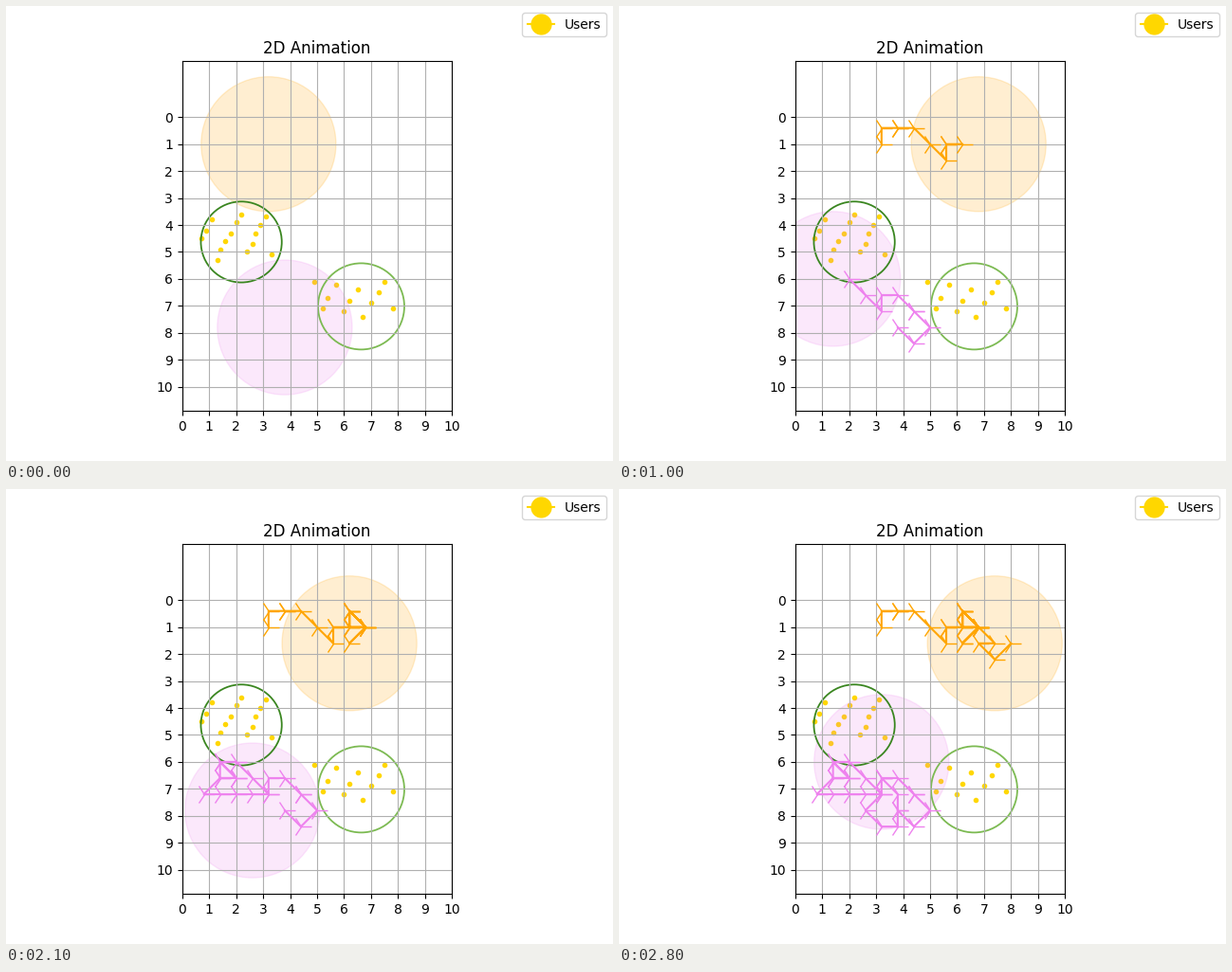
Write a matplotlib script that moves like this. It is 640 by 480 pixels and loops after 2900 ms.

```python
import numpy as np
import matplotlib.pyplot as plt
from matplotlib.animation import FuncAnimation
from matplotlib.lines import Line2D
from matplotlib.patches import Circle

FRAMES = 29
STEP = 0.6
RANGE = 2.5

HEADINGS = {
    "N": (0, -1), "S": (0, 1), "E": (1, 0), "W": (-1, 0),
    "NE": (1, -1), "NW": (-1, -1), "SE": (1, 1), "SW": (-1, 1),
    "stay": (0, 0),
}


def walk(start, route):
    """Positions visited when following compass steps from start."""
    moves = [(0, 0)] + [HEADINGS[h] for h in route.split()]
    return np.array(start) + STEP * np.cumsum(moves, axis=0)


def crowd(xs, ys, n, phase, drift):
    """Users spread evenly over xs, their heights cycling through ys."""
    x = np.linspace(*xs, n)
    y = np.interp((phase - drift * np.arange(n)) % 1, (0, 1), ys)
    return np.round(np.column_stack([x, y]), 1)


class Drone:
    def __init__(self, ax, color, start, route):
        self.path = walk(start, route)
        self.disc = ax.add_patch(
            Circle(start, RANGE, color=color, alpha=0.18))
        self.trail, = ax.plot([], [], color=color, marker="4",
                              markersize=16)

    def show(self, i):
        self.disc.center = tuple(self.path[i])
        self.trail.set_data(self.path[:i, 0], self.path[:i, 1])
        return self.disc, self.trail


fig, ax = plt.subplots(figsize=(6.4, 4.8), dpi=100)
ax.set_aspect("equal")
ax.set(xlim=(0, 10), ylim=(10.9, -2.1),
       xticks=range(11), yticks=range(11))
ax.set_title("2D Animation", pad=5.4)
ax.grid(True)

# Users lie below the discs, and the grid runs over both.
for users in (crowd((0.7, 3.3), (3.5, 5.3), 15, 0.56, 0.19),
              crowd((4.9, 7.8), (6.0, 7.4), 12, 0.07, 0.30)):
    ax.plot(*users.T, "o", color="gold", markersize=3, zorder=0.9)

drones = [
    Drone(ax, "orange", (3.2, 1.0),
          "N E stay E SE SE N stay E E NW SE SW NE "
          "NW S N stay S E SW NE stay SE W SE NE W"),
    Drone(ax, "violet", (3.8, 7.8),
          "SE NE NW stay NW W S NW NW W SE NW S E "
          "W SW E E E E SW SE E N N NW stay N"),
]

for center, radius, color in [((2.19, 4.63), 1.5, "#3a8620"),
                              ((6.635, 7.02), 1.6, "#7cba52")]:
    ax.add_patch(Circle(center, radius, fill=False, edgecolor=color,
                        linewidth=1.3))

key = Line2D([], [], color="gold", marker="o", markersize=15)
fig.legend([key], ["Users"], loc="upper right")


def update(i):
    return [artist for drone in drones for artist in drone.show(i)]


anim = FuncAnimation(fig, update, frames=FRAMES, interval=100,
                     repeat=True, repeat_delay=0, blit=False)
plt.show()
```
